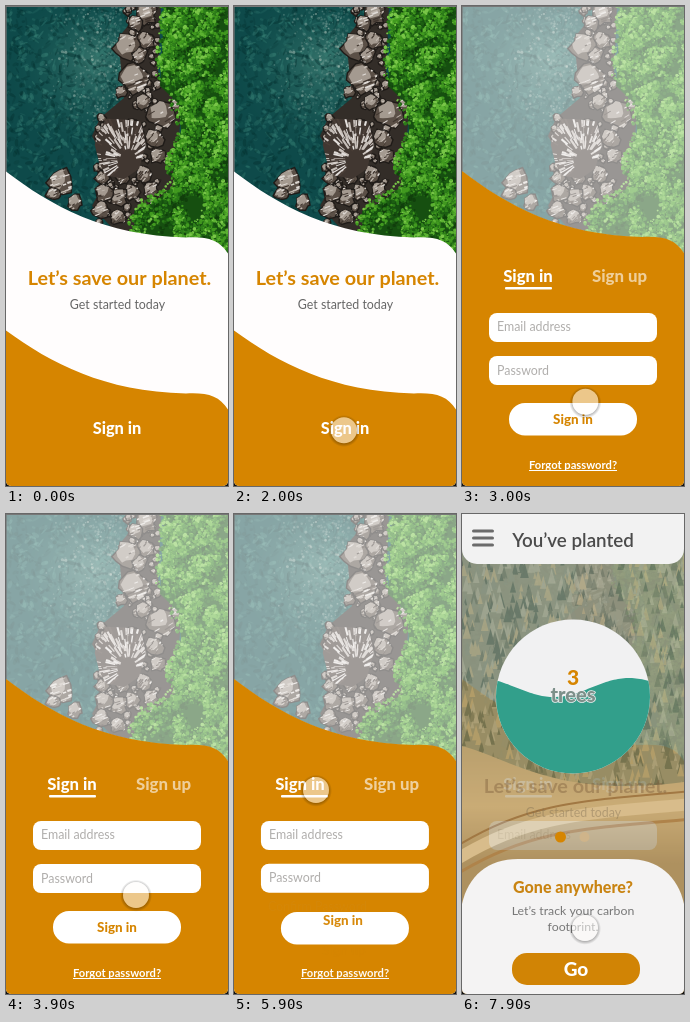
Animation, 222 px wide and 480 px high, one loop 8000 ms. Source, as an HTML page with a canvas:

```html
<!DOCTYPE html>
<html lang="en">
<head>
<meta charset="utf-8">
<title>Save our planet</title>
<style>
html, body { margin: 0; width: 100%; height: 100%; overflow: hidden; background: #fff; }
canvas { display: block; width: 100vw; height: 100vh; }
</style>
</head>
<body>
<canvas id="stage"></canvas>
<script>
const W = 222, H = 480, LOOP = 8000;
const ORANGE = '#d68500', INK = '#4b4b4b', HINT = '#b0aeac';
const canvas = document.getElementById('stage');
const dpr = window.devicePixelRatio || 1;
canvas.width = W * dpr;
canvas.height = H * dpr;
const ctx = canvas.getContext('2d');

const clamp = v => Math.max(0, Math.min(1, v));
const lerp = (a, b, k) => a + (b - a) * k;
const easeOut = (t, start, dur) => 1 - (1 - clamp((t - start) / dur)) ** 3;
const smooth = k => k * k * (3 - 2 * k);

function seeded(seed) {
  return () => {
    seed = (seed + 0x6D2B79F5) | 0;
    let r = Math.imul(seed ^ (seed >>> 15), 1 | seed);
    r = (r + Math.imul(r ^ (r >>> 7), 61 | r)) ^ r;
    return ((r ^ (r >>> 14)) >>> 0) / 4294967296;
  };
}

// Neighbouring rows of [key, values...] around a key
function track(rows, key) {
  let i = 1;
  while (i < rows.length - 1 && rows[i][0] < key) i++;
  const p = rows[i - 1], q = rows[i];
  const k = clamp((key - p[0]) / (q[0] - p[0]));
  return { k, p, q };
}

function layer(w, h, paint) {
  const c = document.createElement('canvas');
  c.width = w * 2;
  c.height = h * 2;
  const g = c.getContext('2d');
  g.scale(2, 2);
  paint(g);
  return c;
}

function disc(g, x, y, r, fill) {
  g.fillStyle = fill;
  g.beginPath();
  g.arc(x, y, r, 0, Math.PI * 2);
  g.fill();
}

function blobPath(g, rnd, x, y, r, tall = 1) {
  g.beginPath();
  for (let i = 0; i < 11; i++) {
    const a = i * Math.PI * 2 / 11 + rnd() * .4, d = r * (.7 + rnd() * .45);
    g.lineTo(x + Math.cos(a) * d, y + Math.sin(a) * d * tall);
  }
  g.closePath();
}

function stone(g, rnd, x, y, r, tall = 1) {
  g.save();
  blobPath(g, rnd, x, y, r, tall);
  g.fillStyle = '#5b5047';
  g.fill();
  g.strokeStyle = '#1f1b18';
  g.lineWidth = 1.4;
  g.stroke();
  g.clip();
  blobPath(g, rnd, x - r * .15, y - r * .25, r * .72, tall);
  g.fillStyle = '#a49a90';
  g.fill();
  const tilt = -.9 + rnd() * .6;
  for (let i = 0; i < r * 1.6; i++) {
    const sx = x + (rnd() - .5) * r * 2, sy = y + (rnd() - .5) * r * 2, len = r * (.2 + rnd() * .5);
    g.strokeStyle = ['#e0dbd6', '#c2b9b0', '#40362f'][rnd() * 3 | 0];
    g.lineWidth = .5 + rnd() * r * .12;
    g.beginPath();
    g.moveTo(sx, sy);
    g.lineTo(sx + Math.cos(tilt) * len, sy + Math.sin(tilt) * len);
    g.stroke();
  }
  g.restore();
}

const SHORE = [[0, 153], [50, 151], [80, 149], [98, 168], [125, 170], [150, 161],
  [180, 163], [197, 142], [205, 123], [250, 124]];
const ROCKS = [[140, 8, 11], [130, 17, 8], [140, 34, 9], [121, 41, 14], [134, 50, 8], [129, 73, 15],
  [115, 86, 6], [137, 96, 8], [155, 108, 14], [171, 99, 7], [148, 132, 10], [152, 150, 8],
  [138, 168, 9], [126, 186, 8], [113, 191, 9], [98, 187, 9], [96, 172, 7], [95, 204, 9],
  [117, 172, 7], [54, 176, 14], [47, 188, 7], [69, 196, 8], [112, 211, 8], [145, 184, 8]];

const coast = layer(W, 250, g => {
  const rnd = seeded(7);
  g.fillStyle = '#0e4a4a';
  g.fillRect(0, 0, W, 250);
  const shoal = g.createRadialGradient(90, 55, 5, 85, 65, 85);
  shoal.addColorStop(0, 'rgba(62,125,115,.75)');
  shoal.addColorStop(1, 'rgba(20,85,80,0)');
  g.fillStyle = shoal;
  g.fillRect(0, 0, W, 250);
  for (let i = 0; i < 1500; i++) {
    const x = rnd() * 150, y = rnd() * 235;
    g.globalAlpha = .15 + rnd() * .3;
    g.fillStyle = rnd() < .6 ? '#04302f' : '#3a8478';
    g.beginPath();
    g.ellipse(x, y, 1 + rnd() * 4, .6 + rnd() * 1.6, rnd() * 3, 0, 7);
    g.fill();
  }
  // foam drifting towards the stones
  for (let i = 0; i < 500; i++) {
    const x = 40 + Math.sqrt(rnd()) * 75, y = rnd() * 115;
    g.globalAlpha = .1 + rnd() * .4 * Math.abs(Math.sin(x * .09 + y * .12));
    disc(g, x, y, .4 + rnd() * 1.1, '#b5cbc0');
  }
  g.globalAlpha = 1;
  g.fillStyle = '#332d28';
  g.beginPath();
  [[138, 0], [112, 32], [118, 92], [94, 112], [86, 130], [104, 165], [86, 200], [118, 235], [165, 235], [175, 105], [152, 70], [155, 0]]
    .forEach(p => g.lineTo(p[0], p[1]));
  g.fill();
  for (let i = 0; i < 150; i++) {
    const y = rnd() * 220;
    stone(g, rnd, y < 100 ? 118 + rnd() * 34 : 90 + rnd() * 75, y, 1.5 + rnd() * 3.5);
  }
  for (const [x, y, r] of ROCKS) stone(g, rnd, x, y, r, 1.05);
  // the large ridged rock
  g.save();
  blobPath(g, rnd, 113, 138, 32);
  g.fillStyle = '#413731';
  g.fill();
  g.clip();
  for (let i = 0; i < 190; i++) {
    const a = 2.3 + rnd() * 4.2, d = 8 + rnd() * 34, len = 4 + rnd() * 9;
    const cx = Math.cos(a), cy = Math.sin(a);
    g.strokeStyle = ['#e3dfdc', '#c5bdb7', '#d3ccc7', '#4a3e37'][i % 4];
    g.lineWidth = .7 + rnd() * 1.5;
    g.beginPath();
    g.moveTo(122 + cx * d, 153 + cy * d);
    g.lineTo(122 + cx * (d + len), 153 + cy * (d + len));
    g.stroke();
  }
  g.restore();
  // tree crowns, lit from the upper left
  const leaves = ['#113f0c', '#1c5e12', '#2c7c19', '#41991f', '#5cb232', '#79c648'];
  g.fillStyle = '#164f10';
  g.beginPath();
  g.moveTo(W, 0);
  SHORE.forEach(([y, x]) => g.lineTo(x + 5, y));
  g.lineTo(W, 250);
  g.fill();
  for (let i = 0; i < 150; i++) {
    const y = i * 1.7 - 5, { k, p, q } = track(SHORE, y);
    const r = 6 + rnd() * 8, edge = lerp(p[1], q[1], k) + r * .7;
    const x = lerp(edge, W + 5, rnd());
    for (let j = 0; j < 55; j++) {
      const a = rnd() * 6.3, d = Math.sqrt(rnd()) * r;
      const dx = Math.cos(a) * d, dy = Math.sin(a) * d;
      const lit = 2.6 - (dx + dy) / r * 1.6 + (rnd() - .5) * 3;
      disc(g, x + dx, y + dy, .6 + rnd() * 1.3, leaves[Math.max(0, Math.min(5, lit | 0))]);
    }
  }
});

const forest = layer(W, H, g => {
  const rnd = seeded(21);
  g.fillStyle = '#8c9078';
  g.fillRect(0, 0, W, H);
  const tones = ['#737b66', '#89907a', '#a1a38b', '#64705e', '#aaa17d'];
  for (let i = 0; i < 1500; i++) {
    const x = rnd() * W, y = i * .2, s = 2 + rnd() * 3.5;
    g.fillStyle = tones[rnd() * 5 | 0];
    g.beginPath();
    g.moveTo(x, y - s * 2);
    g.lineTo(x + s * .8, y + s);
    g.lineTo(x - s * .8, y + s);
    g.fill();
  }
  const field = g.createLinearGradient(0, 235, 0, 350);
  field.addColorStop(0, '#b5a784');
  field.addColorStop(.5, '#c7b48d');
  field.addColorStop(1, '#a69472');
  g.fillStyle = field;
  g.beginPath();
  g.moveTo(0, 232);
  g.bezierCurveTo(50, 245, 95, 285, W, 268);
  g.lineTo(W, H);
  g.lineTo(0, H);
  g.fill();
  g.lineCap = 'round';
  [[12, '#d8c8a6', 0], [3, '#a78459', 15], [2, '#977650', -13]].forEach(([w, color, dy]) => {
    g.lineWidth = w;
    g.strokeStyle = color;
    g.beginPath();
    g.moveTo(-5, 345 + dy);
    g.bezierCurveTo(70, 300 + dy, 120, 300 + dy, 230, 290 + dy);
    g.stroke();
  });
});

function text(str, x, y, size, weight, color, align = 'center', alpha = 1) {
  if (alpha <= 0) return;
  ctx.save();
  ctx.globalAlpha *= alpha;
  ctx.font = `${weight} ${size}px Lato, "Open Sans", sans-serif`;
  ctx.textAlign = align;
  ctx.fillStyle = color;
  ctx.fillText(str, x, y);
  ctx.restore();
}

function box(x, y, w, h, r, fill, alpha = 1) {
  ctx.save();
  ctx.globalAlpha *= alpha;
  ctx.fillStyle = fill;
  ctx.beginPath();
  ctx.roundRect(x, y, w, h, r);
  ctx.fill();
  ctx.restore();
}

function wave(y, depth, fill) {
  ctx.fillStyle = fill;
  ctx.beginPath();
  ctx.moveTo(0, y);
  ctx.bezierCurveTo(45, y + depth * .52, 98, y + depth * .97, 180, y + depth);
  ctx.bezierCurveTo(201, y + depth - 1, 213, y + depth + 2, W, y + depth + 16);
  ctx.lineTo(W, H);
  ctx.lineTo(0, H);
  ctx.fill();
}

function greeting(alpha, color, soft) {
  text('Let’s save our planet.', 113.5, 278.5, 19.8, 700, color, 'center', alpha);
  text('Get started today', 111.5, 303, 12.4, 400, soft, 'center', alpha);
}

function form(t, a) {
  const b = easeOut(t, 4350, 400), c = easeOut(t, 5610, 450);
  const back = t >= 5610, s = back ? 1 - c : b;
  const rest = 1 - a, dx = -6 * rest - 1.5 * s, dy = 193 * rest;
  box(27 + dx, 307 + dy, 168, 29, 8, '#fff');
  box(27 + dx, lerp(350, 343, s) + dy, 168, 29, 8, '#fff');
  box(27, 379, 168, 29, 8, '#fff', s * s);
  box(47 + dx, lerp(397, 420, s) + dy, 128, 32.5, 16, '#fff');
  box(43 + 90 * s - 74 * rest, 281 + 226 * rest, 47, 2.4, 1, '#fff');

  text('Sign in', 66, 276, 16.7, 800, '#fff', 'center', a * lerp(1, .6, s));
  text('Sign up', 157.5, 276, 16.8, 800, '#fff', 'center', a * lerp(.6, 1, s));
  text('Email address', 35 - s, 325, 12.4, 400, HINT, 'left', a);
  text('Password', 35 - s, lerp(368.5, 361, s), 12.4, 400, HINT, 'left', a);
  text('Confirm Password', 34, 397, 12.4, 400, HINT, 'left', s);

  const fly = back ? c : 1;
  text('Sign in', lerp(66, 111, fly), lerp(275, 417.5, fly), 13.4, 800, ORANGE, 'center', a * (1 - s));
  text('Sign up', lerp(157, 110, b), lerp(275, 441, b), 13.4, 800, ORANGE, 'center', s);

  text('Forgot password?', 111, 462.5 + dy, 11.2, 700, '#fff', 'center', 1 - s);
  box(67, 464 + dy, 88, 1, 0, '#fff', 1 - s);
}

function globe(t, q) {
  ctx.save();
  ctx.globalAlpha = q;
  ctx.beginPath();
  ctx.arc(111, 182.5, 77, 0, Math.PI * 2);
  ctx.clip();
  ctx.fillStyle = '#f1f1f2';
  ctx.fillRect(30, 100, 162, 165);
  ctx.fillStyle = '#329f8b';
  ctx.beginPath();
  ctx.moveTo(30, 265);
  for (let x = 30; x <= 192; x += 2) {
    ctx.lineTo(x, 173.5 + 9.5 * Math.sin((x - 54) / 24 + (7900 - t) / 500));
  }
  ctx.lineTo(192, 265);
  ctx.fill();
  ctx.restore();
  text('3', 111, 171, 21, 800, ORANGE, 'center', q);
  ctx.save();
  ctx.globalAlpha = q;
  ctx.font = '800 20px Lato, sans-serif';
  ctx.textAlign = 'center';
  ctx.strokeStyle = '#f1f1f2';
  ctx.lineWidth = 1.6;
  ctx.strokeText('trees', 111, 188);
  ctx.fillStyle = '#7d908a';
  ctx.fillText('trees', 111, 188);
  ctx.restore();
}

function home(t, q) {
  if (!q) return;
  ctx.globalAlpha = q * .84;
  ctx.drawImage(forest, 0, 0, W, H);
  ctx.globalAlpha = 1;
  greeting(q * .42, '#7b5d3c', '#7b6b50');
  globe(t, q);
  ctx.globalAlpha = q;
  disc(ctx, 98.5, 323, 5.5, ORANGE);
  disc(ctx, 122.5, 323, 5, '#cfb48a');
  ctx.globalAlpha = 1;

  ctx.save();
  ctx.translate(0, -60 * (1 - q));
  box(0, -20, W, 70, 15, '#f2f2f2');
  for (let i = 0; i < 3; i++) box(10, 15.5 + i * 7, 22, 3, 1.5, '#6b6b6b');
  text('You’ve planted', 111, 33, 18.8, 600, INK);
  ctx.restore();

  ctx.save();
  ctx.translate(0, 140 * (1 - q));
  ctx.fillStyle = '#f4f3f3';
  ctx.beginPath();
  ctx.moveTo(0, H);
  ctx.lineTo(0, 390);
  ctx.bezierCurveTo(6, 362, 26, 345, 56, 345);
  ctx.lineTo(166, 345);
  ctx.bezierCurveTo(196, 345, 216, 362, W, 390);
  ctx.lineTo(W, H);
  ctx.fill();
  text('Gone anywhere?', 111, 379, 16, 800, '#c98412');
  text('Let’s track your carbon', 111, 401, 12.3, 400, '#777');
  text('footprint.', 111, 417, 12.3, 400, '#777');
  box(50, 439, 128, 32, 15, '#d18405');
  text('Go', 114, 461.5, 19, 800, '#fff');
  ctx.restore();
}

const PATH = [[700, 238, 178], [1100, 187, 241], [1900, 110, 424], [2500, 109, 428], [3300, 130, 381],
  [3900, 130, 381], [4330, 157, 281], [4850, 157, 281], [5500, 82, 276], [5950, 82, 276],
  [7100, 122, 414], [7900, 123, 414]];

function pointer(t) {
  if (t < 700) return;
  const { k, p, q } = track(PATH, t), e = smooth(k);
  const x = lerp(p[1], q[1], e), y = lerp(p[2], q[2], e);
  // shadow only around the rim, so the disc stays clear inside
  const rim = ctx.createRadialGradient(x, y + .7, 12, x, y + .7, 16);
  rim.addColorStop(0, 'rgba(0,0,0,.32)');
  rim.addColorStop(1, 'rgba(0,0,0,0)');
  ctx.fillStyle = rim;
  ctx.beginPath();
  ctx.arc(x, y, 17, 0, Math.PI * 2);
  ctx.arc(x, y, 13, 0, Math.PI * 2, true);
  ctx.fill();
  disc(ctx, x, y, 13, 'rgba(255,253,252,.55)');
}

function draw(t) {
  const a = easeOut(t, 2300, 515), q = easeOut(t, 7500, 400);
  ctx.setTransform(canvas.width / W, 0, 0, canvas.height / H, 0, 0);
  ctx.globalAlpha = 1;
  ctx.fillStyle = '#111';
  ctx.fillRect(0, 0, W, H);
  ctx.save();
  ctx.beginPath();
  ctx.roundRect(0, 0, W, H, [0, 0, 5, 5]);
  ctx.clip();
  ctx.drawImage(coast, 0, 0, W, 250);
  box(0, 0, W, 250, 0, '#fff', .5 * a);
  box(0, 0, W, 1, 0, '#777');
  box(0, 0, 1, 250, 0, '#777', .6);
  wave(165.5, 66, '#fffdfd');
  greeting(1 - a, ORANGE, '#666');
  wave(lerp(324.5, 165, a), lerp(63, 66, a), ORANGE);
  text('Sign in', 111, 428, 16.4, 800, '#fff', 'center', 1 - a);
  if (a > 0) form(t, a);
  home(t, q);
  pointer(t);
  ctx.restore();
}

function frame() {
  draw(performance.now() % LOOP);
  requestAnimationFrame(frame);
}
frame();
</script>
</body>
</html>
```
